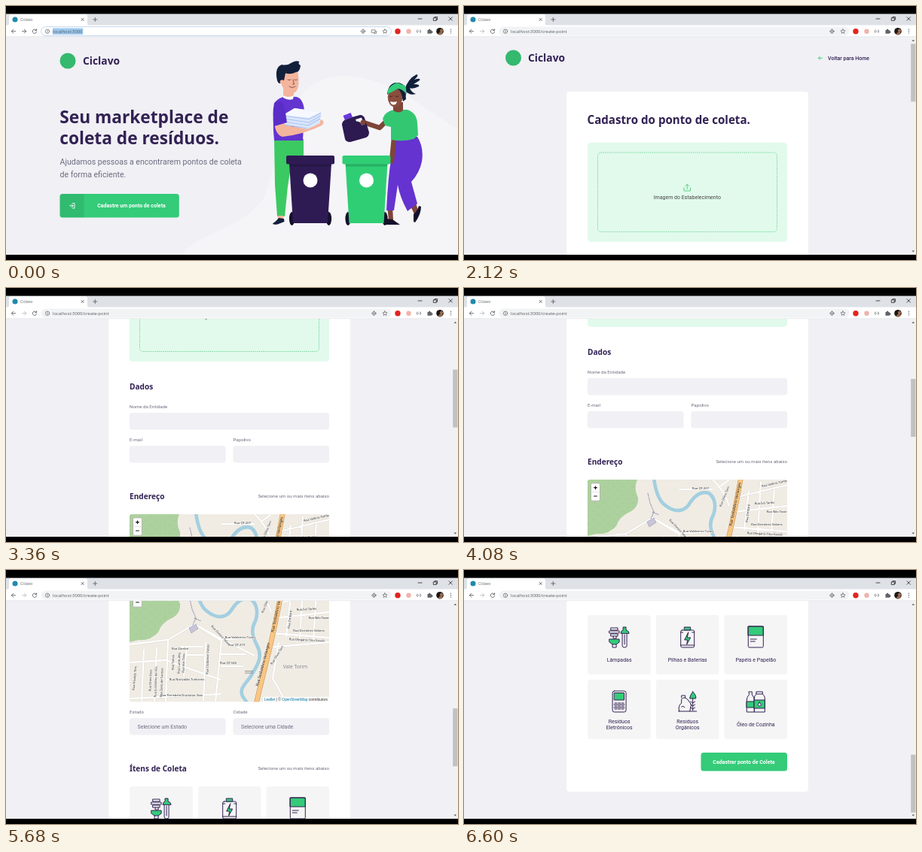
An HTML page that plays this animation: 600 px wide and 338 px high, repeating every 7.16 s.

```html
<!DOCTYPE html>
<html lang="pt-BR">
<head>
<meta charset="utf-8">
<title>Ciclavo</title>
<style>
html, body { margin: 0; width: 100%; height: 100%; overflow: hidden; background: #000; }
svg { display: block; width: 600px; height: 338px; }
text { font-family: Roboto, sans-serif; font-size: 7.03px; fill: #6c6c80; white-space: pre; }
.ui { font-family: "Open Sans", sans-serif; font-size: 5.85px; fill: #55595d; }
.head { font-family: "Noto Sans", sans-serif; font-weight: 700; fill: #322153; }
.h1 { font-size: 22.7px; }
.h2 { font-size: 15.15px; }
.h3 { font-size: 10.15px; }
.brand { font-size: 13.8px; }
.lead { font-size: 10.56px; }
.label { font-size: 6.15px; }
.dark { fill: #322153; }
.cta { fill: #fff; font-weight: 700; }
.mid { text-anchor: middle; }
.end { text-anchor: end; }
.street { font-family: "Noto Sans", sans-serif; font-size: 4.1px; fill: #222; text-anchor: middle;
  paint-order: stroke; stroke: #fff; stroke-width: .6px; }
.main { font-size: 4.9px; stroke: none; }
.credit { font-family: "Liberation Sans", sans-serif; font-size: 4.85px; fill: #333; text-anchor: end; }
.credit tspan { fill: #0078a8; }
.line { fill: none; stroke: #5f6368; stroke-width: .9; stroke-linecap: round; stroke-linejoin: round; }
.thin { stroke-width: .7; }
.ico { fill: none; stroke: #322153; stroke-width: 1; stroke-linejoin: round; stroke-linecap: round; }
.ico .g { fill: #34cb79; }
</style>
</head>
<body>
<svg viewBox="0 0 600 338">
  <defs>
    <clipPath id="view"><path d="M0 41H600V331H0z"/></clipPath>
    <clipPath id="mapBox"><rect x="164" y="115" width="265" height="154.3" rx="3"/></clipPath>
    <pattern id="trees" width="13" height="11" patternUnits="userSpaceOnUse">
      <path d="M2 4l1.500-2L5 4M3.500 4v1M8 9l1.500-2L11 9M9.500 9v1" fill="none" stroke="#9acb8a" stroke-width=".6"/>
    </pattern>
    <path id="wood" d="M164 115H230Q225 126 231 139 232 151 222 157 206 164 202 177 190 189 176 187L164 190z"/>
    <g id="bin">
      <ellipse cx="-24.500" cy="84" rx="3.600" ry="9" fill="#15102b"/>
      <ellipse cx="24.500" cy="84" rx="3.600" ry="9" fill="#15102b"/>
      <path d="M-28 10H28L23 90H-23z"/>
      <path d="M-28 11H28l-.3 3.500H-27.700z" fill="#000" opacity=".16"/>
      <rect x="-32" width="64" height="11.500" rx="2"/>
      <circle cy="33" r="9.500" fill="#fff"/>
    </g>
    <g id="target" class="line thin"><circle r="2.300"/><path d="M-.8 0H.8M0-.8V.8M0-3v.7M0 2.300v.7M-3 0h.7M2.300 0h.7"/></g>
  </defs>

  <!-- pages -->
  <g clip-path="url(#view)">
    <path d="M0 41H600V331H0z" fill="#f0f0f5"/>

    <g id="home">
      <path d="M234 331C258 298 316 298 344 252C364 196 368 95 446 93C508 94 546 130 600 164V331z" fill="#f5f5f8"/>
      <circle cx="82" cy="73" r="10.500" fill="#34b96f"/>
      <text class="head brand" x="102" y="78">Ciclavo</text>
      <text class="head h1" x="71.300" y="156">Seu marketplace de</text>
      <text class="head h1" x="71.300" y="183.500">coleta de resíduos.</text>
      <text class="lead" x="71.500" y="211.300">Ajudamos pessoas a encontrarem pontos de coleta</text>
      <text class="lead" x="71.500" y="227.700">de forma eficiente.</text>
      <rect id="cta" x="71.500" y="250" width="158.300" height="31.600" rx="3.500"/>
      <path d="M75 250h28.500v31.600H75q-3.500 0-3.500-3.500v-24.600q0-3.500 3.500-3.500z" opacity=".08"/>
      <path class="line" style="stroke:#fff" d="M84.500 265.800h4.500M87.200 263.800l2 2-2 2M88.500 262.500h2.500v6.600h-2.500"/>
      <text class="cta mid" x="166.500" y="268.400">Cadastre um ponto de coleta</text>

      <!-- man with papers -->
      <path fill="#3bc962" d="M356 177H395V202H380L374 240 370 280H360L357 238z"/>
      <path fill="#f4b59c" d="M361 279h7v5h-7z"/>
      <path fill="#141f3c" d="M362 282l7 1 .5 4-9 3.500q-6 1-6.500-1 5-3 8-7.500z"/>
      <path fill="#6334d0" d="M357 128Q363 121 373 120L386 121Q395 124 396 140L394 179 356 179Q353 150 357 128z"/>
      <path fill="#fff" d="M368 118l14 1-1 5q-7 2-13-2z"/>
      <path fill="#f4b59c" d="M368 106h14v13q-7 4-14 0zM364 92L387 87Q389.500 98 388 107 386 117 378 116 367 114 364 98z"/>
      <path fill="#121f3b" d="M360 99Q356 82 366 78 373 80 380 75 385 72 389.500 74 387 77 391 79 390 88 385 88 378 91.500 371 89.500L369 99 364 103Q361 103 360 99z"/>
      <circle cx="366.500" cy="101" r="2.800" fill="#f4b59c"/>
      <path class="line thin" style="stroke:#57303a" d="M374 98q2 1.500 4 0M383 98q2 1.500 3.500 0M376 107q4 3 8 0M381 98l1.500 6h-2"/>
      <path fill="#f4b59c" d="M356 155L372 152 378 160Q396 164 410 155l9-4q5 4 0 8Q395 171 367 174 358 172 356 155z"/>
      <path fill="#dbe6fb" d="M368 145L383 136 418 141 417 156 400 164 370 158z"/>
      <path fill="#f5f8ff" d="M368 145L383 136 418 141 402 149z"/>
      <path fill="none" stroke="#a9c3f0" stroke-width="1.200" d="M368 146l34 4.500 16-8M369 150l33 5 16-9M369 154l32 5 16-9M370 158l31 5"/>
      <path fill="#5a2cc8" d="M356 129Q367 123 370 136L373 155 356 160Q353 144 356 129z"/>

      <!-- woman with jug -->
      <path fill="#121f3b" d="M529 112Q533 97 545 91 549 92 542 98 551 95 549 99 543 103 541 104 550 104 548 107 540 111 536 109 538 115 544 117 536 120 529 112z"/>
      <circle cx="519.500" cy="114" r="12" fill="#121f3b"/>
      <path fill="#7e4638" d="M506 266h7l1 19h-6zM535 262l8-3 4 13-5 5z"/>
      <path fill="#6533cf" d="M512 174H546Q555 188 552 207 549 222 538 234L546 263 533 273Q523 255 520 238L515 272H505Q507 230 511 205z"/>
      <path fill="#15102b" d="M505 283l8 1 10 7h-19zM541 277q5-4 7-11l3 1q0 10-8 21l-2-1z"/>
      <path fill="none" stroke="#7e4638" stroke-width="6.500" stroke-linejoin="round" stroke-linecap="round" d="M507 151L496 162 475 155M515 176L512 206"/>
      <path fill="#34c772" d="M500 150Q504 139 517 138L533 138Q545 142 546 156L547 172 541 177Q527 181 511 178L511 161 503 159z"/>
      <path fill="#7e4638" d="M514 128h13v11q-6 5-13 0z"/>
      <ellipse cx="516.500" cy="121.500" rx="9.800" ry="13" fill="#8a4e3f"/>
      <path fill="#121f3b" d="M506 118Q507 104 517 102 530 103 531 124l-4 3q-1-12-7-17-7 2-14 8z"/>
      <path fill="#34cb79" d="M506.500 113Q510 105 519 102L530 106Q532 111 531 117 526 110 520 110 514 114 507 117z"/>
      <path class="line thin" style="stroke:#35181b" d="M509 120q2 1.500 4 0M517 120q2 1.500 4 0"/>
      <path fill="#fff" d="M510 127q5 1.500 9 0-1 4.500-4.500 4.500T510 127z"/>
      <path fill="#2c1a50" d="M452 150L470 145Q474 145 476 149L482 168Q482 173 478 175L457 181Q451 181 450 177L446 158Q446 153 452 150z"/>
      <path fill="#6a3ad8" d="M447.500 146l10-4 2.500 6-10 4z"/>
      <path fill="#f4f4f8" d="M464 151l8-2.500 3 9-3 1q-1-5-7-5z"/>
      <circle cx="474" cy="155" r="3.500" fill="#7e4638"/>

      <use href="#bin" x="404" y="199" fill="#2e1b53"/>
      <use href="#bin" x="478.500" y="199" fill="#2fce75"/>
    </g>

    <g id="form">
      <circle cx="65.500" cy="70" r="10.500" fill="#34b96f"/>
      <text class="head brand" x="85" y="75">Ciclavo</text>
      <path class="line" style="stroke:#34cb79" d="M475.500 70.300h-5M472.500 68.300l-2 2 2 2"/>
      <text class="dark" x="483" y="72.800" font-weight="500">Voltar para Home</text>
      <rect x="136.300" y="115" width="320.600" height="905" rx="3.500" fill="#fff"/>
      <text class="head h2" x="163.500" y="157.700">Cadastro do ponto de coleta.</text>
      <rect x="164" y="182.700" width="265" height="132" rx="4.400" fill="#e1faec"/>
      <rect x="177.500" y="196" width="238" height="105.500" rx="4.400" fill="none" stroke="#4ecb79" stroke-width=".8" stroke-dasharray="1.3 1.3"/>
      <path class="line" style="stroke:#4ecb79" d="M292 243v4h8.500v-4M296.300 244.500v-6M293.800 240.800l2.500-2.500 2.500 2.500"/>
      <text class="mid" x="296.300" y="258.300" style="fill:#444">Imagem do Estabelecimento</text>
      <g id="fields"></g>

      <g transform="translate(0 403)" clip-path="url(#mapBox)">
        <path d="M164 115h265v155H164z" fill="#f0ece4"/>
        <use href="#wood" fill="#add19e"/>
        <use href="#wood" fill="url(#trees)"/>
        <path fill="none" stroke="#a3cfe0" stroke-width="4.600" d="M252 113C254 128 258 143 267 149 278 158 290 159 298 149 307 134 316 130 325 133 335 140 334 154 331 162 324 174 328 184 333 194 341 208 335 219 327 232 319 246 309 250 314 262L321 272"/>
        <g id="roads"></g>
        <path d="M243 171l9-5 3 6-9 6z" fill="#c9c5d6" stroke="#8e8aa8" stroke-width=".5"/>
        <path d="M244 133l3 13 5 12-4 9M250 158l9 4" fill="none" stroke="#8e8aa8" stroke-width="1.200" stroke-dasharray="1.5 1"/>
        <path d="M367.500 113Q359 160 350 198L332 272" fill="none" stroke="#bd8e50" stroke-width="6.600"/>
        <path d="M367.500 113Q359 160 350 198L332 272" fill="none" stroke="#f9c683" stroke-width="5.600"/>
        <path d="M317 228.500h11M317 231h11" stroke="#555" stroke-width=".6"/>
        <g id="streets"></g>
        <text class="street" x="384" y="224.500" style="font-size:6.600px;fill:#777">Vale Torim</text>
        <path d="M341 262.800h88v7h-88z" fill="#fff" opacity=".75"/>
        <text class="credit" x="427" y="267.600"><tspan>Leaflet</tspan> | © <tspan>OpenStreetMap</tspan> contributors</text>
        <rect x="168.500" y="119.800" width="12" height="23.400" rx="1.800" fill="#fff" stroke="#b5b3ae" stroke-width="1"/>
        <path d="M168.500 131.500h12" stroke="#ccc" stroke-width=".5"/>
        <path d="M172.200 125.700h4.600M174.500 123.400v4.600M172.200 137h4.600" stroke="#111" stroke-width="1.200"/>
      </g>

      <g id="cards"></g>
      <rect x="314.500" y="968" width="114.500" height="24.600" rx="3.500" fill="#34cb79"/>
      <text class="cta mid" x="371.500" y="982.800">Cadastrar ponto de Coleta</text>
    </g>

    <g id="bar">
      <path d="M592.500 41H600V331H592.500z" fill="#f1f1f1"/>
      <path d="M594.500 46.700l1.800-2 1.800 2zM594.500 325.500l1.800 2 1.800-2z" fill="#555"/>
      <rect id="thumb" x="593.200" y="50" width="6.200" height="77" fill="#c1c1c1"/>
    </g>
    <g id="status">
      <path d="M0 321H197q2 0 2 2V331H0z" fill="#dee1e6"/>
      <text class="ui" x="4" y="328" style="font-size:5.200px">Aguardando a.tile.openstreetmap.org...</text>
    </g>
  </g>

  <!-- browser frame -->
  <path d="M0 10.500H600V26H0z" fill="#dee1e6"/>
  <path d="M0 25.500H600V41H0z" fill="#fff"/>
  <path d="M0 40.700H600" stroke="#dadce0" stroke-width=".6"/>
  <path d="M1 26q3 0 3-3v-9q0-3 3-3h98q3 0 3 3v9q0 3 3 3z" fill="#fff"/>
  <circle cx="12" cy="18" r="3.500" fill="#2189ad"/>
  <text class="ui" x="19" y="20" style="font-size:5px">Ciclavo</text>
  <path class="line" d="M100 16.400l3.200 3.200M103.200 16.400l-3.200 3.200M115.800 18h5M118.300 15.500v5"/>
  <g class="line" style="stroke:#222;stroke-width:.8">
    <path d="M547 17h5M588 14.800l4.400 4.400M592.400 14.800l-4.400 4.400"/>
    <path d="M567.700 15.800h3.600v3.600h-3.600zM569 15.800v-1.200h3.600v3.600h-1.300"/>
  </g>
  <path class="line" d="M12.500 33.700h-5M9.800 31.200l-2.500 2.500 2.500 2.500M40.300 32.300a2.700 2.700 0 1 0 .3 2.200M40.600 30.700v2h-2"/>
  <path id="next" class="line" d="M21.500 33.700h5M24.200 31.200l2.500 2.500-2.500 2.500"/>
  <rect id="omni" x="46.500" y="27.600" width="465" height="12" rx="6" stroke-width=".7"/>
  <g class="line thin"><circle cx="55" cy="33.700" r="2.700"/><path d="M55 33.500v1.500M55 32.200v.1"/></g>
  <path id="select" d="M62 29.500h40.300v8.500H62z" fill="#9cc8ee"/>
  <text id="url" class="ui" x="62" y="35.800"></text>
  <g id="focused">
    <use href="#target" x="474" y="33.700"/>
    <path class="line thin" d="M485.500 31.800h4.500v3.500H485.500zM490.500 33.300h1v3h-3"/>
  </g>
  <use id="idle" href="#target" x="488.500" y="33.700"/>
  <path class="line thin" d="M503 30.700l.9 2 2.200.2-1.700 1.400.6 2.100-2-1.200-2 1.200.6-2.100-1.700-1.400 2.200-.2z"/>
  <circle cx="520" cy="33.700" r="3.700" fill="#e1251f"/>
  <circle cx="534.500" cy="33.700" r="3.200" fill="#f0b3ac"/>
  <path class="line" d="M546 32q-1.300 1.700 0 3.400M550 32q1.300 1.700 0 3.400M547.700 33.700h.6"/>
  <path d="M559.500 32h1.500a1.200 1.200 0 1 1 2.300 0h1.500v1.500a1.200 1.200 0 1 1 0 2.200v1h-5.300z" fill="#5f6368"/>
  <circle cx="576" cy="33.700" r="4.800" fill="#1c1715"/>
  <path d="M574 38q0-3 3-3.500a2 2 0 1 1 2 0l1 1.500q-2 3-6 2z" fill="#9b6a4f"/>
  <g fill="#5f6368"><circle cx="590.500" cy="31.300" r=".7"/><circle cx="590.500" cy="33.700" r=".7"/><circle cx="590.500" cy="36.100" r=".7"/></g>
</svg>

<script>
const $ = id => document.getElementById(id);
const text = (x, y, s, cls) => `<text class="${cls}" x="${x}" y="${y}">${s}</text>`;
const HALF = 127.5, FULL = 265, RIGHT = 301.5;

// label, box and optional placeholder
const field = (x, y, w, label, hint = '') =>
  text(x, y, label, 'label') +
  `<rect x="${x}" y="${y + 5.7}" width="${w}" height="22.500" rx="3.500" fill="#f0f0f5"/>` +
  text(x + 10.5, y + 19.4, hint, '');
const section = (y, title, hint = '') =>
  text(164, y, title, 'head h3') + text(429, y - 1.2, hint, 'label end');
const pick = 'Selecione um ou mais ítens abaixo';

$('fields').innerHTML =
  section(351.6, 'Dados') +
  field(164, 377.3, FULL, 'Nome da Entidade') +
  field(164, 421.3, HALF, 'E-mail') + field(RIGHT, 421.3, HALF, 'Papolivo') +
  section(497.6, 'Endereço', pick) +
  field(164, 688.3, HALF, 'Estado', 'Selecione um Estado') +
  field(RIGHT, 688.3, HALF, 'Cidade', 'Selecione uma Cidade') +
  section(764.6, 'Ítens de Coleta', pick);

const roads = [
  'M164 193L215 187 250 166 285 185 330 208', 'M250 166L286 188 278 270', 'M215 187L212 270', 'M183 200L180 270',
  'M200 197L197 270', 'M240 196L236 236', 'M265 190L262 270', 'M164 217L212 214 285 240', 'M164 265L285 259',
  'M212 240H262', 'M285 206H318', 'M285 222H315', 'M290 186L330 184', 'M286 128H330', 'M330 115Q346 130 352 150',
  'M363 138L429 122', 'M357 158L429 150', 'M352 178L429 184', 'M348 197L429 190', 'M378 130L372 182',
  'M394 118L390 186', 'M412 126L408 188', 'M362 190L354 238 372 270', 'M232 196h30M232 207h30', 'M340 124L352 115'
].join('');
const stroke = (c, w) => `<path d="${roads}" fill="none" stroke="${c}" stroke-width="${w}"/>`;
$('roads').innerHTML = stroke('#d6d1c8', 2.9) + stroke('#fff', 2.3);

const avenue = 'Rua Teobaldino Verlanges';
$('streets').innerHTML = [
  [314, 128, 0, 'Rua QT-207'], [361.5, 148, -78, avenue], [342.5, 220, -75, avenue],
  [284, 182, 47, 'Rua Osmiro Talves'], [311, 184.5, 0, 'Rua Valdemiro Tunes'], [306, 194.5, 0, 'Rua QT-319'],
  [295, 218.5, 0, 'Rua QT-546'], [231, 200, 0, 'Rua Zumbé'], [223, 217, -88, 'Rua Tarivo'], [231, 218, -88, 'Rua Lume-Alto'],
  [237, 218, -88, 'Rua dos Tirés'], [269, 213, -88, 'Rua Clodomar Vintes'], [172, 238, -85, 'Rua Nivaldo Tors'],
  [193, 241, -88, 'Rua Otino Vass'], [200, 243, -88, 'Rua Jurandino da Vila'], [208, 244, -88, 'Rua Zeno de Tarmes'],
  [240, 240.5, 0, 'Rua Norivaldo Timbrens'], [233, 262, 0, 'Rua Florisbela Drummer Vatz'], [361, 208, -58, 'Rua Olívio Tarn'],
  [347, 138, -68, 'Rua Olívio Tarn'], [414, 121, -12, 'Rua Valério Tombes'], [399, 147.5, -3, 'Rua Ivo Tarles'],
  [417, 158.5, 0, 'Rua Nilo Tavergi'], [402, 175.5, 0, 'Rua Demétrio Valtens'], [399, 188.5, 3, 'Rua Olegário Tino Varelli'],
  [378, 160, -83, 'Rua Zimbaré']
].map(([x, y, a, s]) => `<text class="street ${s === avenue ? 'main' : ''}" transform="translate(${x} ${y}) rotate(${a})">${s}</text>`).join('');

const items = [
  ['Lâmpadas', '<path d="M-11-12h9v3h-9zM-13-8H0v3H-13zM-11-4h9v3h-9zM-8-1v3h4v-3"/><path class="g" d="M-13 3H0v4l-4 3h-5l-4-3z"/><path d="M-9 10v4h5v-4M4-4V12q0 2 3 2t3-2V-4M7-3V10"/><path class="g" d="M2-5q0-3 3-4v-4h4v4q4 1 4 4z"/>'],
  ['Pilhas e Baterias', '<rect x="-9" y="-9" width="18" height="23" rx="2"/><path class="g" d="M-4-13H4V-9H-4z"/><path class="g" d="M1-6L-4 4H0L-1 10 4 1H0z"/><path d="M-9-6H-6M6-6H9M-9 11H9"/>'],
  ['Papéis e Papelão', '<path class="g" d="M-10-14H10V-2H-10z"/><rect x="-10" y="-14" width="20" height="28" rx="1.500"/><path d="M-7 3H1M-7 6H-1"/>'],
  ['Resíduos|Eletrônicos', '<rect x="-9" y="-14" width="18" height="28" rx="2.500"/><path class="g" d="M-6.500-11.500H6.500V-2H-6.500z"/><path d="M-6 2h3M-1.500 2h3M3 2h3M-6 6h3M-1.500 6h3M3 6h3M-6 10h3M-1.500 10h3M3 10h3M-7 4H7M-7 8H7"/>'],
  ['Resíduos|Orgânicos', '<path d="M-12 13H12M-11 13Q-13 6-8 2V-3Q-5-7 0-3L5 4 3 13M-8-5v-3h5v3M-8 7q3-2 4 1"/><path class="g" d="M7-13q5 5 4 9H3Q3-8 7-13z"/><path d="M7-4V12M4 0l3 2 3-2M4 4l3 2 3-2M4 8l3 2 3-2"/>'],
  ['Óleo de Cozinha', '<path d="M-9-13h4v4q3 3 3 7V14H-12V-2q0-4 3-7z"/><path class="g" d="M-12 0H-2V8H-12z"/><path d="M1-13H9v3H1zM1-10q-3 2-3 5V14H12V-5q0-3-3-5"/><path class="g" d="M-2-2H12V9H-2z"/><path d="M5 1q4 5 0 5t0-5z" fill="#fff"/>']
];
$('cards').innerHTML = items.map(([name, icon], i) => {
  const x = 164.3 + i % 3 * 90.6, y = i < 3 ? 785 : 871, mid = x + 41.8;
  const lines = name.split('|');
  const top = y + (lines.length > 1 ? 57.8 : 62.2);
  return `<rect x="${x}" y="${y}" width="83.600" height="79" rx="3.500" fill="#f5f5f5"/>` +
    `<g class="ico" transform="translate(${mid} ${y + 29})">${icon}</g>` +
    lines.map((s, k) => text(mid, top + k * 8.6, s, 'dark mid')).join('');
}).join('');

// wheel scrolling: time in ms, page offset in px
const LOOP = 7160, STEP = 40;
const keys = [[2080, 0], [2760, 101], [3440, 220], [3840, 220], [4080, 263], [4520, 352],
  [4760, 352], [5080, 403], [5440, 484], [5600, 484], [5680, 497], [6600, 725]];
const rate = i => (keys[i + 1][1] - keys[i][1]) / (keys[i + 1][0] - keys[i][0]);
const slope = i => {
  if (i === 0 || i === keys.length - 1) return 0;
  const a = rate(i - 1), b = rate(i);
  return a * b > 0 ? 2 * a * b / (a + b) : 0;
};
function scrollAt(t) {
  if (t <= keys[0][0]) return 0;
  const i = keys.findIndex(k => k[0] >= t) - 1;
  if (i < 0) return keys[keys.length - 1][1];
  const [t0, a] = keys[i], [t1, b] = keys[i + 1];
  const d = t1 - t0, u = (t - t0) / d, v = 1 - u;
  return a * v * v * (1 + 2 * u) + b * u * u * (3 - 2 * u)
    + d * u * v * (slope(i) * v - slope(i + 1) * u);
}

const show = (id, on) => { $(id).style.display = on ? '' : 'none'; };
function draw(now) {
  const t = Math.floor(now % LOOP / STEP) * STEP;
  const focus = t < 160, form = t >= 840, y = Math.round(scrollAt(t));
  show('select', focus);
  show('focused', focus);
  show('idle', !focus);
  $('omni').setAttribute('fill', focus ? '#fff' : '#f1f3f4');
  $('omni').setAttribute('stroke', focus ? '#a9c9e8' : 'none');
  $('url').textContent = 'localhost:3000' + (form ? '/create-point' : '');
  $('next').setAttribute('opacity', form ? .4 : 1);
  $('cta').setAttribute('fill', t < 440 ? '#34cb79' : '#2fb86e');
  show('home', !form);
  show('form', form);
  show('bar', form);
  $('form').setAttribute('transform', `translate(0 ${-y})`);
  $('thumb').setAttribute('y', 50 + y * .27);
  show('status', t >= 1040 && t < 1480);
  $('status').setAttribute('opacity', t < 1320 ? 1 : t < 1400 ? .66 : .33);
}
const start = performance.now();
(function tick() {
  draw(performance.now() - start);
  requestAnimationFrame(tick);
})();
</script>
</body>
</html>
```
